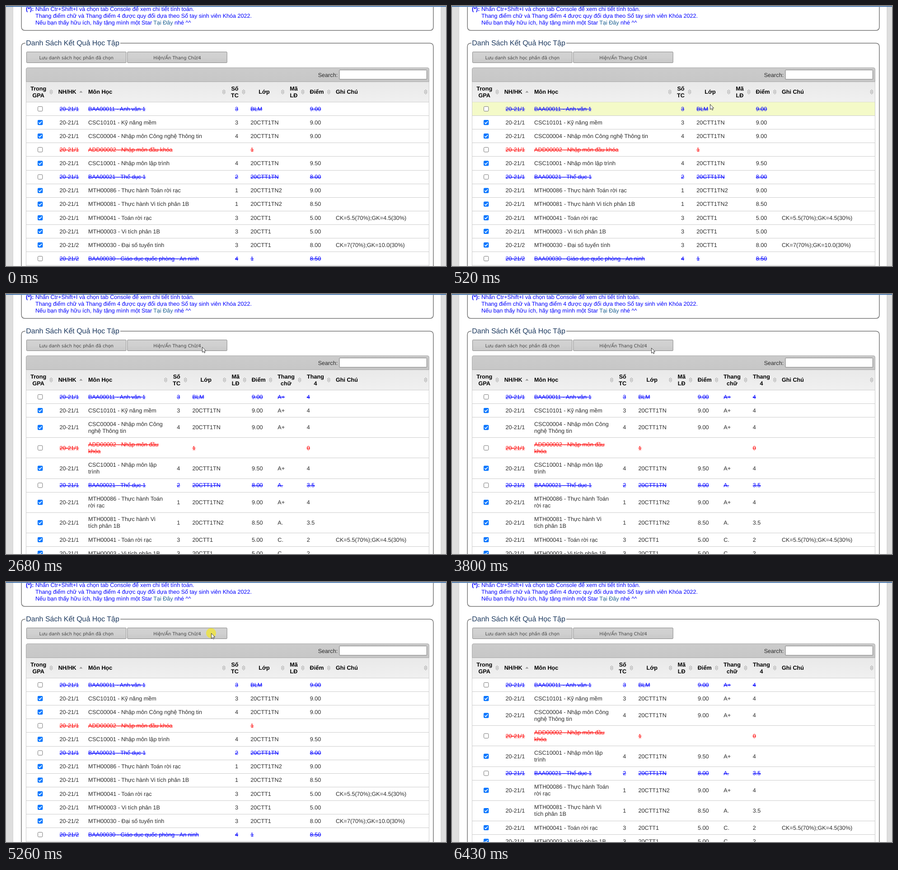
Write an HTML page that moves like this. It is 974 px wide and 575 px high and loops after 6.76 s.

```html
<!DOCTYPE html>
<html lang="vi">
<head>
<meta charset="utf-8">
<title>Kết quả học tập</title>
<style>
html, body { margin: 0; width: 100%; height: 100%; overflow: hidden; background: #fff; }
svg { display: block; }
text { font: 12.62px "Liberation Sans", Arial, sans-serif; fill: #2c2c2c; text-rendering: geometricPrecision; white-space: pre; }
.b { font-weight: bold; fill: #000; }
.m { text-anchor: middle; }
.note, .note tspan { fill: #00f; font-size: 12.55px; }
.note .link { fill: #1b6091; }
.legend { font-size: 15.98px; fill: #1f3b60; }
.btn { font: 9.95px "DejaVu Sans", Verdana, sans-serif; fill: #444; }
.blue { fill: #00f; text-decoration: line-through; }
.red { fill: #f00; text-decoration: line-through; }
.frame { fill: none; stroke: #777; stroke-width: 1.5; }
</style>
</head>
<body>
<svg id="stage" width="974" height="575" viewBox="0 0 974 575"></svg>
<script>
const LOOP = 6760, TOP = 212.5, LEFT = 44.5, RIGHT = 936.5;

// style | subject (~ marks the narrow-column break) | credits | class | score | letter | 4-scale | note
const rows = `blue|BAA00011 - Anh văn 1|3|BLM|9.00|A+|4|
|CSC10101 - Kỹ năng mềm|3|20CTT1TN|9.00|A+|4|
|CSC00004 - Nhập môn Công~nghệ Thông tin|4|20CTT1TN|9.00|A+|4|
red|ADD00002 - Nhập môn đầu~khóa||1|||0|
|CSC10001 - Nhập môn lập~trình|4|20CTT1TN|9.50|A+|4|
blue|BAA00021 - Thể dục 1|2|20CTT1TN|8.00|A.|3.5|
|MTH00086 - Thực hành Toán~rời rạc|1|20CTT1TN2|9.00|A+|4|
|MTH00081 - Thực hành Vi~tích phân 1B|1|20CTT1TN2|8.50|A.|3.5|
|MTH00041 - Toán rời rạc|3|20CTT1|5.00|C.|2|CK=5.5(70%);GK=4.5(30%)
|MTH00003 - Vi tích phân 1B|3|20CTT1|5.00|C.|2|
|MTH00030 - Đại số tuyến tính|3|20CTT1|8.00|B+|3.5|CK=7(70%);GK=10.0(30%)
blue|BAA00030 - Giáo dục quốc phòng - An ninh|4|1|8.50|A.|3.5|`.split("\n").map(r => r.split("|"));

const text = (x, y, s, cls = "") => s ? `<text x="${x}" y="${y}" class="${cls}">${s}</text>` : "";
const rect = (x, y, w, h, fill, extra = "") =>
  `<rect x="${x}" y="${y}" width="${w}" height="${h}" fill="${fill}" ${extra}/>`;
const gradient = (id, ...colors) => `<linearGradient id="${id}" x2="0" y2="1">` +
  colors.map((c, i) => `<stop offset="${i / (colors.length - 1)}" stop-color="${c}"/>`).join("") + "</linearGradient>";

function button(x, label) {
  return rect(x, 101.5, 220.5, 24, "url(#btn)", 'stroke="#888" rx="1"') +
    text(x + 110.3, 117.5, label, "btn m");
}

function checkbox(y, on) {
  return on
    ? rect(70, y - 5.7, 11.3, 11.3, "#0075ff", 'rx="2"') +
      `<path d="M72.3 ${y}l2.4 2.5 4.4-5.2" fill="none" stroke="#fff" stroke-width="1.7"/>`
    : rect(70.5, y - 5.2, 10.3, 10.3, "#fff", 'rx="2" stroke="#767676"');
}

const sortIcon = x => `<path d="M${x - 3.2} 188.6l3.2-3.6 3.2 3.6zm0 2.8l3.2 3.6 3.2-3.6z" fill="#f6f6f6" stroke="#999" stroke-width=".9"/>`;

function header(x, label, cls = "b m") {
  const lines = label.split("~");
  return lines.map((s, i) => text(x, 194 + (lines.length - 1) * (i * 15 - 7.5), s, cls)).join("");
}

function makeTable(wide) {
  const dx = wide ? -128.8 : 0;
  const edges = [TOP];
  let out = header(71.7, "Trong~GPA") + header(115.7, "NH/HK", "b") + header(182, "Môn Học", "b") +
    header(506.5 + dx, "Số~TC") + header(571.5 + dx, "Lớp") + header(637 + dx, "Mã~LĐ") +
    header(688 + dx, "Điểm") + header(730, "Ghi Chú", "b") +
    '<path d="M162.2 191.5l3.7-4 3.7 4z" fill="#999"/>' +
    [100, 714.5, 929].map(sortIcon).join("") +
    [482.3, 526, 612.5, 657].map(x => sortIcon(x + dx)).join("");
  if (wide) out += header(620, "Thang~chữ") + header(685, "Thang~4") + sortIcon(585.7) + sortIcon(650);

  rows.forEach(([cls, subject, credits, group, score, letter, four, note], i) => {
    const lines = wide ? subject.split("~") : [subject.replace("~", " ")];
    const top = edges[i], h = 30.1 + (lines.length - 1) * 15;
    const mid = top + h / 2, base = mid + 4.2;
    const cell = (x, s, more = "") => text(x, base, s, cls + more);
    out += checkbox(mid, !cls) + cell(140, i < 10 ? "20-21/1" : "20-21/2", " m") +
      lines.map((s, k) => text(182, base + (lines.length - 1) * (k * 15 - 7.5), s, cls)).join("") +
      cell(510.5 + dx, credits, " m") + cell(541.3 + dx, group) + cell(672.8 + dx, score) + cell(730, note);
    if (wide) out += cell(601.3, letter) + cell(665.8, four);
    edges.push(top + h);
    out += rect(LEFT, Math.round(top + h - .5), RIGHT - LEFT, 1, "#ccc");
  });
  return { edges, svg: `<g id="${wide ? "wide" : "narrow"}">${out}</g>` };
}

const tables = [makeTable(false), makeTable(true)];
const stage = document.getElementById("stage");
stage.innerHTML = `<defs>${gradient("btn", "#d2d2d2", "#d0d0d0", "#c8c8c8")}${gradient("bar", "#cbcbcb", "#c7c7c7")}${gradient("head", "#e9e9e9", "#f0f0f0")}</defs>` +
  rect(0, 0, 974, 575, "#fff") + rect(0, 0, 15, 575, "#dedede") + rect(963, 0, 11, 575, "#dedede") +
  rect(15, 0, 1, 575, "#d0d0d0") + rect(962.5, 0, 1, 575, "#c8c8c8") +
  rect(0, 0, 974, 1.6, "#2b62a3") +
  '<path class="frame" d="M34.2 2V46q0 8 8 8H938q8 0 8-8V2M43 82.3h-1q-8 0-8 8V580M253 82.3H938q8 0 8 8V580"/>' +
  text(44, 11.3, '<tspan font-weight="bold">(*):</tspan>', "note") +
  text(65, 11.3, "Nhấn Ctr+Shift+I và chọn tab Console để xem chi tiết tính toán.", "note") +
  text(65, 26.4, "Thang điểm chữ và Thang điểm 4 được quy đổi dựa theo Sổ tay sinh viên Khóa 2022.", "note") +
  text(65, 41.4, 'Nếu bạn thấy hữu ích, hãy tặng mình một Star <tspan class="link">Tại Đây</tspan> nhé ^^', "note") +
  text(44.3, 87.4, "Danh Sách Kết Quả Học Tập", "legend") +
  button(45.5, "Lưu danh sách học phần đã chọn") + button(268.7, "Hiện/Ẩn Thang Chữ/4") +
  '<path d="M44.5 167.5V140q0-3.5 3.5-3.5H933q3.5 0 3.5 3.5V167.5z" fill="url(#bar)" stroke="#aaa"/>' +
  text(690.7, 157, "Search:") + rect(738, 141.5, 193.5, 20.5, "#fff", 'stroke="#777" rx="1"') +
  rect(LEFT, 168, RIGHT - LEFT, 44, "url(#head)") + rect(LEFT, 212, RIGHT - LEFT, 1, "#ccc") +
  rect(LEFT, 0, RIGHT - LEFT, 0, "#f4fac8", 'id="hover"') +
  tables.map(t => t.svg).join("") +
  '<path d="M44.5 168V575M936.5 168V575" stroke="#ccc"/>' +
  '<circle id="click" r="11" fill="#f5e71e" fill-opacity=".68"/>' +
  '<path id="cursor" d="M.5.5V12L3.2 9.6 4.9 13.3 6.8 12.5 5.2 8.8H8.6Z" fill="#fff" stroke="#333" stroke-width=".95"/>';

// pointer samples: time, x, y (no position = off stage)
const pointer = [
  [0],
  [150, 960, 562], [230, 938, 486], [300, 875, 405], [370, 788, 329], [450, 680, 262],
  [520, 571, 217], [590, 513, 181], [660, 476, 157], [730, 455, 142], [800, 443, 132],
  [870, 437, 123], [940, 433, 117], [2680, 434, 117], [2740, 435, 117], [2940, 436, 117], [3020, 437, 117],
  [3800, 441, 119], [3880, 470, 128], [3950, 510, 138], [4030, 535, 140],
  [4110, 525, 132], [4190, 495, 121], [4260, 466, 115], [4340, 454, 113],
  [5590, 500, 117], [5660, 620, 145], [5725, 768, 203], [5790, 895, 288], [5860, 958, 373], [5930],
  [6290, 944, 566], [6360, 936, 571], [6430]
];
const clicks = [[1400, 1540], [4600, 4680], [5260, 5390]];

const [hover, narrow, wide, click, cursor] =
  ["hover", "narrow", "wide", "click", "cursor"].map(id => document.getElementById(id));
const show = (el, on) => el.setAttribute("visibility", on ? "visible" : "hidden");
const move = (el, x, y) => el.setAttribute("transform", `translate(${x} ${y})`);

function draw(t) {
  const isWide = clicks.filter(c => t >= c[1]).length % 2;
  show(narrow, !isWide);
  show(wide, isWide);

  const i = pointer.findLastIndex(p => p[0] <= t);
  const [, x, y] = pointer[i];
  const on = x !== undefined;
  show(cursor, on);
  const pressed = clicks.some(c => t >= c[0] && t < c[1]);
  show(click, pressed);
  if (on) {
    move(cursor, x, y);
    move(click, x, y);
  }

  // row highlight trails the pointer by half a sample
  const [, px = x, py = y] = pointer[i - 1] || [];
  const hx = (x + px) / 2, hy = (y + py) / 2;
  const { edges } = tables[isWide];
  const row = on && hx < RIGHT ? edges.findIndex((e, k) => hy >= e && hy < edges[k + 1]) : -1;
  show(hover, row >= 0);
  if (row >= 0) {
    hover.setAttribute("y", edges[row]);
    hover.setAttribute("height", edges[row + 1] - edges[row]);
  }
}

const start = performance.now();
function tick() {
  draw((performance.now() - start) % LOOP);
  requestAnimationFrame(tick);
}
tick();
</script>
</body>
</html>
```
